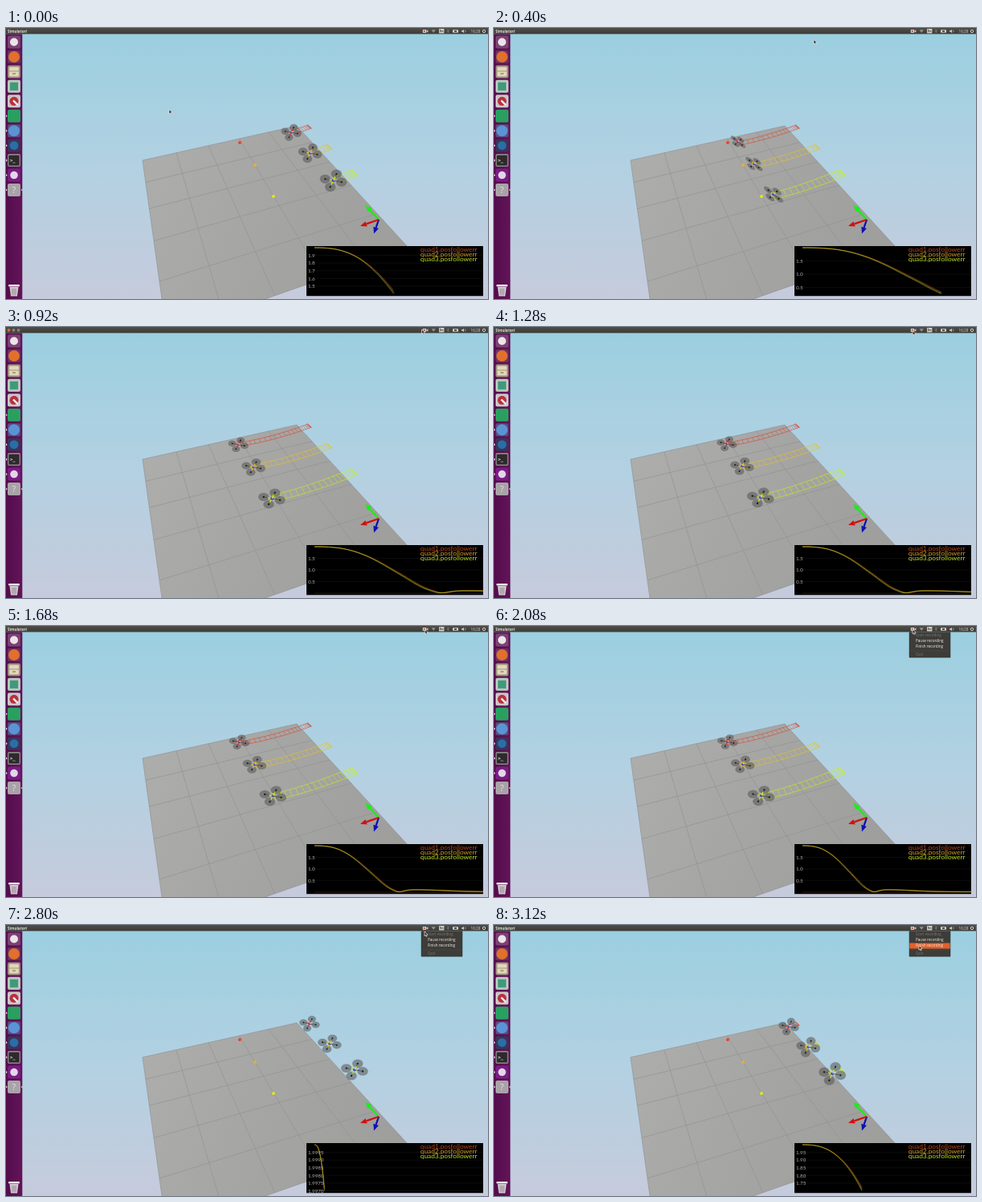
An HTML page with a canvas for the animation above (3.2 s loop, 600 by 338 pixels).

```html
<!DOCTYPE html>
<html lang="en">
<head>
<meta charset="utf-8">
<title>Quadrotor simulator</title>
<style>
html, body { margin: 0; width: 100%; height: 100%; overflow: hidden; background: #000; }
canvas { display: block; width: 100vw; height: 100vh; }
</style>
</head>
<body>
<canvas id="stage"></canvas>
<script>
const W = 600, H = 338, BAR = 7.6, LOOP = 3200, FRAMES = 48;
const RESET = 41, HEAD = 8, MENU_OPEN = 30;
const UI = '"Open Sans", "Noto Sans", sans-serif';
const canvas = document.getElementById('stage');
const ctx = canvas.getContext('2d');
const dpr = window.devicePixelRatio || 1;
canvas.width = W * dpr;
canvas.height = H * dpr;
ctx.scale(dpr, dpr);

const lerp = (a, b, t) => a + (b - a) * t;
const mix = (p, q, t) => [lerp(p[0], q[0], t), lerp(p[1], q[1], t)];
const add = (p, q, k = 1) => [p[0] + q[0] * k, p[1] + q[1] * k];
const range = (n, fn) => Array.from({ length: n }, (_, i) => fn(i));

// Smooth curve through key points; reads column c
function spline(pts, x, c = 1) {
  const n = pts.length;
  if (x <= pts[0][0]) return pts[0][c];
  if (x >= pts[n - 1][0]) return pts[n - 1][c];
  const i = pts.findIndex(p => p[0] >= x) - 1;
  const slope = j => {
    const a = pts[Math.max(0, j - 1)], b = pts[Math.min(n - 1, j + 1)];
    return (b[c] - a[c]) / (b[0] - a[0]);
  };
  const h = pts[i + 1][0] - pts[i][0], t = (x - pts[i][0]) / h, u = 1 - t;
  return pts[i][c] * (1 + 2 * t) * u * u + slope(i) * h * t * u * u
       + pts[i + 1][c] * t * t * (3 - 2 * t) - slope(i + 1) * h * t * t * u;
}

function path(pts) {
  ctx.beginPath();
  pts.forEach(p => ctx.lineTo(p[0], p[1]));
}
function fillPoly(pts, color) {
  path(pts);
  ctx.fillStyle = color;
  ctx.fill();
}
function line(pts, color, width) {
  path(pts);
  ctx.strokeStyle = color;
  ctx.lineWidth = width;
  ctx.stroke();
}
function box(x, y, w, h, color, r = 0) {
  ctx.beginPath();
  ctx.roundRect(x, y, w, h, r);
  ctx.fillStyle = color;
  ctx.fill();
}
function oval(x, y, rx, ry, color, rot = 0) {
  ctx.beginPath();
  ctx.ellipse(x, y, rx, ry, rot, 0, 7);
  ctx.fillStyle = color;
  ctx.fill();
}
const dot = (x, y, r, color) => oval(x, y, r, r, color);
function arc(x, y, r, from, to, color, width) {
  ctx.beginPath();
  ctx.arc(x, y, r, from, to);
  ctx.strokeStyle = color;
  ctx.lineWidth = width;
  ctx.stroke();
}
function text(str, x, y, font, color, align = 'left') {
  ctx.font = font;
  ctx.fillStyle = color;
  ctx.textAlign = align;
  ctx.fillText(str, x, y);
}
function shade(x0, y0, x1, y1, colors) {
  const g = ctx.createLinearGradient(x0, y0, x1, y1);
  colors.forEach((c, i) => g.addColorStop(i / (colors.length - 1), c));
  return g;
}

// ---- flight ----
const RISE = [[4, 0.053], [6, 0.15], [8, 0.3], [11, 0.585], [14, 0.872], [16.4, 1], [19, 1.055], [30, 1.02], [48, 1.004]];
const progress = a => a < 6 ? 0.0015 * Math.pow(a, 2.572) : spline(RISE, a);
const error = a => 2 * Math.max(Math.abs(1 - progress(a)), 0.012);
const tiltAt = a => Math.sin(2 * Math.PI * Math.min(a, 21) / 21);

const quads = [
  { from: [378, 123], to: [291, 144], size: 0.73, lag: 0.97, color: '#d8442c', mark: '#e8402c', plot: '#b4481c' },
  { from: [403, 148], to: [310, 172], size: 0.85, lag: 0.985, color: '#e8c420', mark: '#e8b030', plot: '#d89c2c' },
  { from: [434, 180.5], to: [333, 211], size: 0.97, lag: 1, color: '#c8f414', mark: '#e8e810', plot: '#bce020' }
];

// Screen place at an age, and the share of the way flown
function place(q, age) {
  const p = progress(age), past = Math.max(0, p - 1) * 0.4;
  const s = p < 1 ? p - 0.18 * p * (1 - p) : 1 + past;
  const sag = 9 * Math.max(0, s * (1 - s));
  const [x, y] = mix(q.from, q.to, s);
  return { at: [x, y + sag + past * 110], s };
}

function drawTrail(q, age) {
  const end = Math.min(age, 16.4), k = q.size * q.size;
  const edges = a => {
    const { at, s } = place(q, a);
    const mid = add(at, [0, 2.5 * s]), half = [lerp(4.3, 1, s) * k, lerp(3.9, 4.2, s) * k];
    return [add(mid, half, -1), add(mid, half)];
  };
  const pairs = range(Math.floor(end / 0.35) + 1, i => edges(i * 0.35));
  ctx.globalAlpha = 0.85;
  line(pairs.map(p => p[0]), q.color, 0.7);
  line(pairs.map(p => p[1]), q.color, 0.7);
  pairs.forEach((p, i) => i % 2 || line(p, q.color, 0.6));
  ctx.globalAlpha = 1;
}

function drawQuad(q, age) {
  const { at } = place(q, age), tilt = tiltAt(age), k = q.size;
  const ahead = Math.max(0, tilt), back = Math.max(0, -tilt);
  const u = [10.5 - 4.4 * back, 2 + 4 * back], v = [-4 - 0.4 * back, 7.5 + 1.3 * ahead - 4.2 * back];
  const arms = [add(at, u, -k), add(at, v, -k), add(at, u, k), add(at, v, k)];
  const ry = 5.3 + 0.8 * ahead - 2.6 * back;
  arms.forEach(a => oval(a[0], a[1], 6.9 * k, ry * k, 'rgba(84,84,84,.55)', 0.75 * back));
  arms.forEach(a => {
    line([at, a], '#4a4a50', 0.8);
    dot(a[0], a[1], 1.2 * k, '#1c1c1c');
  });
  line([mix(at, arms[3], 0.65), at, mix(at, arms[1], 0.6)], q.color, 1.4);
  line([mix(at, arms[0], 0.5), at], q.color, 1.2);
  dot(at[0], at[1], 1.9 * k, '#4a48b0');
  dot(at[0] + 0.8, at[1] - 0.8, 0.8, '#e6e0f0');
}

// ---- scene ----
// Unit square to the floor in perspective
function floorAt(u, v) {
  const a = [170, 165], b = [362, 122], d = [200, 381], wb = 1.12, wd = 0.58;
  const w = 1 + u * (wb - 1) + v * (wd - 1);
  return [0, 1].map(i => (a[i] + u * (wb * b[i] - a[i]) + v * (wd * d[i] - a[i])) / w);
}

function drawWorld() {
  box(0, 0, W, H, shade(0, BAR, 0, H, ['#9bcfe0', '#b2d1e2', '#c6cbdc']));
  const rim = [[0, 0], [1, 0], [1, 1], [0, 1], [0, 0]].map(p => floorAt(...p));
  fillPoly(rim, shade(170, 165, 480, 290, ['#adadac', '#a5a5a4', '#9e9e9c']));
  for (let i = 1; i < 5; i++) {
    line([floorAt(0, i / 5), floorAt(1, i / 5)], '#939392', 0.7);
    line([floorAt(i / 5, 0), floorAt(i / 5, 1)], '#939392', 0.7);
  }
  line(rim, '#8c8e8f', 0.6);
  quads.forEach(q => dot(q.to[0], q.to[1] - 1, 1.9, q.mark));
}

function arrow(from, tip, color) {
  const d = Math.hypot(tip[0] - from[0], tip[1] - from[1]);
  const neck = mix(tip, from, 8 / d);
  const side = [(from[1] - tip[1]) / d, (tip[0] - from[0]) / d];
  line([from, neck], color, 2.2);
  fillPoly([tip, add(neck, side, 3.4), add(neck, side, -3.4)], color);
}
function drawAxes() {
  const o = [464, 239];
  arrow(o, [447.5, 221], '#14f014');
  arrow(o, [458, 256.5], '#0c10b4');
  arrow(o, [441, 247], '#d01010');
}

// ---- error plot ----
function tickStep(span) {
  const want = span / 6.5, base = Math.pow(10, Math.floor(Math.log10(want)));
  return base * [1, 2, 5, 10].find(m => m * base >= want);
}

function drawPlot(age) {
  const left = 384, top = 274, tall = 57.5, scale = Math.min(12.35, 210 / age);
  const ages = range(121, i => age * i / 120);
  const low = Math.min(...ages.map(error)), span = 2 - low;
  const toY = e => top + (2 - e) / span * tall;
  const tick = tickStep(span), digits = Math.max(1, Math.ceil(-Math.log10(tick) - 1e-9));

  ctx.save();
  ctx.beginPath();
  ctx.rect(374, 272, 220, 62.5);
  ctx.clip();
  box(374, 272, 220, 62.5, '#000');
  for (let v = 2 - tick; v >= Math.max(low, tick / 2); v -= tick) {
    line([[left, toY(v)], [594, toY(v)]], '#171717', 0.6);
    text(v.toFixed(digits), 376, toY(v) + 2.2, '6.2px Lato, sans-serif', '#b4b4b4');
  }
  line([[left, toY(0)], [594, toY(0)]], '#5c2c14', 0.6);
  quads.forEach((q, i) => {
    line(ages.map(a => [left + a * scale, toY(error(a * q.lag))]), q.plot, 0.55);
    text(`quad${i + 1}.posfollowerr`, 586.5, 278.8 + i * 6.2, '8.3px Lato, sans-serif', q.plot, 'right');
  });
  ctx.restore();
}

// ---- desktop ----
function drawBar(hover) {
  box(0, 0, W, BAR, shade(0, 0, 0, BAR, ['#504e48', '#3c3b36']));
  if (hover) ['#e4603c', '#85827a', '#85827a'].forEach((c, i) => dot(3.5 + i * 6, 4, 2, c));
  else text('Simulatori', 2, 5.6, 'bold 4.6px ' + UI, '#e8e4dc');
  const ink = '#d4d0c6', dim = '#8f8c84';
  box(518.8, 2, 4.4, 4, ink, 0.6);
  fillPoly([[523, 4], [525.4, 2.3], [525.4, 5.7]], ink);
  dot(520.8, 4, 1, '#b03c34');
  fillPoly([[529.6, 2.6], [532.2, 1.9], [534.8, 2.6], [532.2, 6]], dim);
  box(539, 1, 6.4, 5.6, ink, 0.6);
  text('En', 542.2, 5.4, 'bold 4px ' + UI, '#3c3b36', 'center');
  line([[549, 2.6], [551.4, 4.8], [550.2, 6], [550.2, 1.6], [551.4, 2.8], [549, 5]], dim, 0.5);
  box(556, 2.2, 7, 3.6, ink, 0.5);
  box(558, 3, 3, 2, '#55534c');
  fillPoly([[567, 3.2], [568.4, 3.2], [570, 1.8], [570, 6.2], [568.4, 4.8], [567, 4.8]], ink);
  arc(570, 4, 2, -0.9, 0.9, ink, 0.6);
  text('16:28', 584.5, 5.7, '4.7px ' + UI, ink, 'center');
  arc(595, 4, 1.7, 0, 7, ink, 1);
}

// Tile colour, then what is drawn on it around (0, 0)
const DOCK = [
  ['#7b4273', () => dot(0, 0, 5, '#ece4ea')],
  ['#6c3263', () => dot(0, 0, 7, '#e0702c')],
  ['#9c8f7c', () => {
    box(-6, -6, 12, 12, '#e0d6bc', 1);
    box(-6, -1, 12, 1, '#a8946c');
    box(-2, 2, 4, 1.2, '#8c7850');
  }],
  ['#b9c6bd', () => box(-5, -5, 10, 10, '#3f9a7c')],
  ['#cdc4c8', () => {
    dot(0, 0, 5.5, '#b8303c');
    line([[-1, -1], [5, 5]], '#eee8ea', 2.4);
  }],
  ['#2aa060', () => {}],
  ['#5c4a80', () => dot(0, 0, 7, '#5a94d4')],
  ['#3a3458', () => dot(0, 0, 5.4, '#2a6ea8')],
  ['#8a8688', () => {
    box(-6.6, -6.4, 13.2, 12.8, '#2e2a2c', 1);
    text('>_', -5, 1.5, 'bold 5.5px "DejaVu Sans Mono", monospace', '#eee');
  }],
  ['#7a1c84', () => dot(0, 0, 4.8, '#e2d8e6')],
  ['#a9a3a8', () => text('?', 0, 3.6, '10px ' + UI, '#e4e0e4', 'center')]
];

function drawDock() {
  box(0, BAR, 20.3, H, shade(0, 0, 20, 0, ['#520c4c', '#631458']));
  DOCK.forEach(([color, icon], i) => {
    ctx.save();
    ctx.translate(10, 17.5 + i * 18.45);
    box(-8, -8, 16, 16, color, 2);
    icon();
    if (i > 4) fillPoly([[-10, -1.6], [-8.3, 0], [-10, 1.6]], '#e4dce2');
    ctx.restore();
  });
  fillPoly([[20.3, 200.4], [18.6, 202], [20.3, 203.6]], '#e4dce2');
  fillPoly([[4.5, 323], [15.5, 323], [14, 334.5], [6, 334.5]], '#cfc6cc');
  box(3, 320, 14, 2.6, '#f0eaee', 1);
  [8, 10, 12].forEach(x => line([[x, 325], [x, 333]], '#8a7a88', 0.8));
}

function drawMenu(my) {
  box(517, BAR, 51, 31.6, '#3d3c38');
  line([[517, BAR], [517, 39.2], [568, 39.2], [568, BAR]], '#2c2b28', 0.5);
  ['Start recording', 'Pause recording', 'Finish recording', 'Quit'].forEach((label, i) => {
    const y = 13.2 + i * 7.1 + (i > 2 ? 2.3 : 0), live = i === 1 || i === 2;
    if (live && my > y - 4 && my < y + 3) box(517.3, y - 5, 50.4, 7, '#e0602c');
    text(label, 525, y, '4.6px ' + UI, live ? '#f2efe8' : '#7b7871');
  });
  line([[517.5, 31], [567.5, 31]], '#504e48', 0.5);
}

const MOUSE = [[0, 203, 101.5], [6, 398, 14.5], [9, 470, 4], [14, 517.5, 3], [18, 521, 4.5], [36, 521, 4.5], [42, 521, 8], [47, 529, 25.5]];

function drawMouse(x, y) {
  const shape = [[0, 0], [0, 5.6], [1.3, 4.5], [2.1, 6.5], [3.1, 6], [2.3, 4.1], [4, 4], [0, 0]].map(p => add([x, y], p));
  fillPoly(shape, '#242424');
  line(shape, '#f0f0f0', 0.7);
}

function draw(k) {
  const age = k < RESET ? k + HEAD : Math.max(0.2, k - RESET);
  const mx = spline(MOUSE, k, 1), my = spline(MOUSE, k, 2);
  drawWorld();
  quads.forEach(q => drawTrail(q, age));
  quads.forEach(q => drawQuad(q, age));
  drawAxes();
  drawPlot(age);
  drawDock();
  drawBar(my < BAR && mx < 519);
  if (k >= MENU_OPEN) drawMenu(my);
  drawMouse(mx, my);
}

// Fifteen pictures a second, on a 40 ms clock
const startOf = k => Math.round(k * 5 / 3) * 40;
const began = performance.now();
let shown = -1;
function tick() {
  const t = (performance.now() - began) % LOOP;
  let k = FRAMES - 1;
  while (k > 0 && startOf(k) > t) k--;
  if (k !== shown) draw(shown = k);
  requestAnimationFrame(tick);
}
tick();
</script>
</body>
</html>
```
